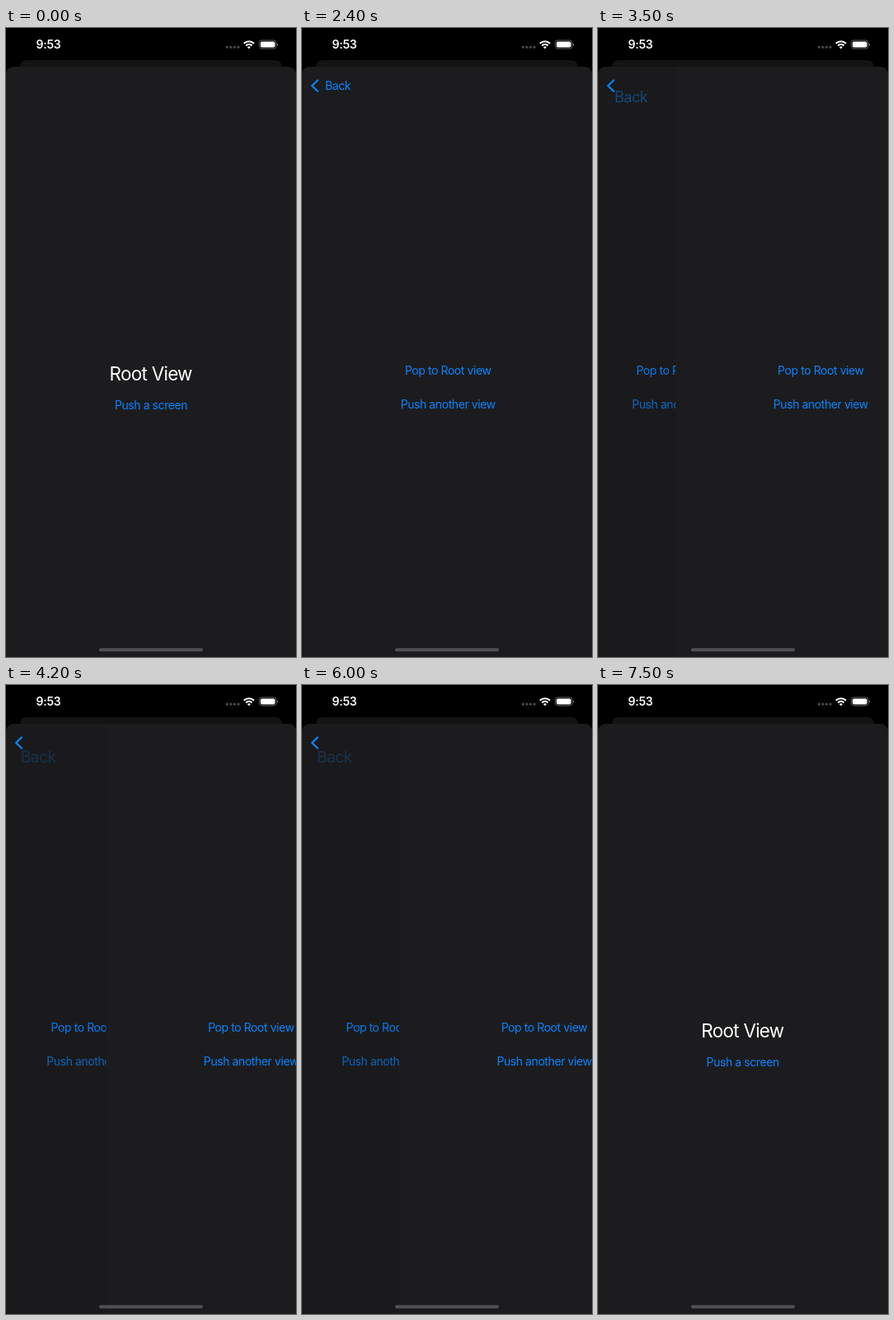
Recreate the animation shown at these times as an HTML page. Size 352 by 762 pixels, loop 7.6 s.

```html
<!DOCTYPE html>
<html lang="en">
<head>
<meta charset="utf-8">
<title>Navigation stack</title>
<style>
  html, body { margin: 0; width: 100%; height: 100%; overflow: hidden; background: #000; }
  svg { display: block; width: 352px; height: 762px; }
  text { font-family: Inter, Roboto, sans-serif; font-size: 14px; letter-spacing: -.42px; fill: #0a84ff; }
  .mid { text-anchor: middle; }
  .title { font-size: 22.5px; letter-spacing: -.75px; fill: #fff; }
  .clock { font-weight: 600; letter-spacing: -.2px; fill: #fff; }
  .panel { fill: #1c1c1e; }
</style>
</head>
<body>
<svg viewBox="0 0 352 762">
  <defs>
    <clipPath id="sheet"><path d="M0 762V56a9 9 0 0 1 9-9H343a9 9 0 0 1 9 9V762z"/></clipPath>
  </defs>
  <rect width="352" height="762"/>

  <!-- status bar -->
  <text class="clock mid" x="51.5" y="25">9:53</text>
  <g fill="#48484a">
    <circle cx="268.3" cy="23.2" r="1.6"/><circle cx="272.9" cy="23.2" r="1.6"/>
    <circle cx="277.4" cy="23.2" r="1.6"/><circle cx="282" cy="23.2" r="1.6"/>
  </g>
  <g fill="none" stroke="#fff" stroke-width="2.2">
    <path d="M288.8 18.8a8.6 8.6 0 0 1 12.2 0M291.3 21.4a5.1 5.1 0 0 1 7.2 0"/>
    <path d="M294.9 25.3l-2-2a2.9 2.9 0 0 1 4 0z" fill="#fff" stroke="none"/>
  </g>
  <rect x="307.4" y="15" width="20.6" height="10" rx="3" fill="none" stroke="#69696b" stroke-width=".9"/>
  <rect x="308.9" y="16.4" width="17.6" height="7.2" rx="1.8" fill="#fff"/>
  <path d="M329 18.3a1.8 1.8 0 0 1 0 3.4z" fill="#69696b"/>

  <rect x="17" y="39" width="318" height="30" rx="8" fill="#131314"/>
  <g clip-path="url(#sheet)">
    <rect class="panel" y="47" width="352" height="715"/>
    <g id="under">
      <g id="root">
        <text class="title mid" x="175.7" y="427">Root View</text>
        <text class="mid" id="rootPush" x="176" y="462">Push a screen</text>
      </g>
      <g id="detail">
        <text class="mid" x="176" y="419.5">Pop to Root view</text>
        <text class="mid" id="detailPush" x="176" y="461">Push another view</text>
      </g>
    </g>
    <rect id="dim" y="47" width="352" height="715"/>
    <g id="over">
      <rect class="panel" y="47" width="352" height="715"/>
      <text class="mid" id="overPop" x="176" y="419.5">Pop to Root view</text>
      <text class="mid" x="176" y="461">Push another view</text>
    </g>
    <text id="oldBack">Back</text>
    <text id="newBack">Back</text>
    <path id="chevron" d="M19.6 62.8L12.2 70l7.4 7.2" fill="none" stroke="#0a84ff" stroke-width="2.2"/>
  </g>
  <rect x="113" y="751.3" width="126" height="4" rx="2" fill="#515153"/>
</svg>
<script>
  const LOOP = 7600, STEP = 100, WIDTH = 352;
  const PUSHES = [1113, 1837, 2637, 3314.5, 4040, 4614.5, 5837];
  const POP = 6921, TAP_LEAD = 38;
  const el = Object.fromEntries([...document.querySelectorAll('[id]')].map(n => [n.id, n]));
  const clamp = v => Math.min(1, Math.max(0, v));

  // Critically damped spring: the share of the way still to go.
  function remaining(ms) {
    const u = 0.014 * Math.max(0, ms);
    return u > 9.2 ? 0 : (1 + u) * Math.exp(-u);
  }

  // A tapped label dims at once, then recovers.
  function tapOpacity(ms) {
    return ms < 0 ? 1 : 1 - 0.6 * clamp(1 - ms / 330);
  }

  function show(node, opacity, transform) {
    node.setAttribute('opacity', opacity);
    if (transform) node.setAttribute('transform', transform);
  }

  function draw(t) {
    const popping = t >= POP;
    let last = 0;
    PUSHES.forEach((start, i) => { if (t >= start - (i ? TAP_LEAD : 0)) last = i; });
    const since = t - PUSHES[last];
    const edge = popping ? 1 - remaining(t - POP) : remaining(since);
    const progress = 1 - edge;
    const fromRoot = popping || last === 0;

    show(el.root, fromRoot ? 1 : 0);
    show(el.detail, fromRoot ? 0 : 1);
    show(el.under, 1, `translate(${-0.3 * WIDTH * progress})`);
    show(el.dim, 0.1 * progress);
    show(el.over, 1, `translate(${WIDTH * edge})`);

    show(el.rootPush, popping ? 1 : tapOpacity(since));
    show(el.detailPush, tapOpacity(since + TAP_LEAD));
    show(el.overPop, tapOpacity(t - POP));

    // The new back label shrinks out of the large title position.
    show(el.newBack, clamp((progress - 0.59) * 3),
      `translate(${28 - 30 * edge} ${75 + 56 * edge}) scale(${1 + 1.12 * edge})`);
    show(el.oldBack, fromRoot ? 0 : clamp(1 - 1.6 * progress),
      `translate(${28 - 40 * progress} 75)`);
    show(el.chevron, fromRoot ? progress : 1);
  }

  const begin = performance.now();
  function tick() {
    const t = (performance.now() - begin) % LOOP;
    draw(Math.floor(t / STEP) * STEP);
    requestAnimationFrame(tick);
  }
  tick();
</script>
</body>
</html>
```
